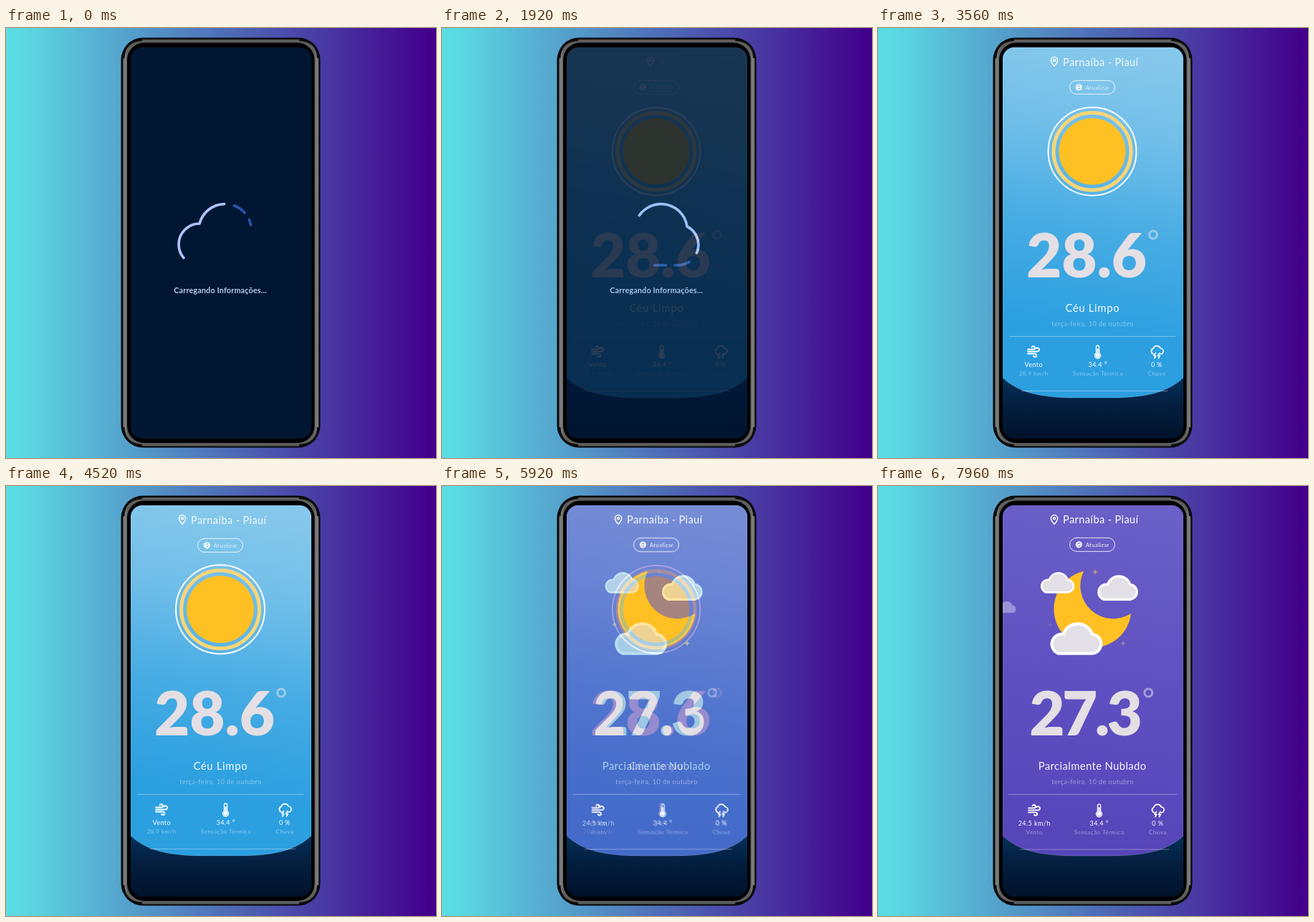
Recreate the animation shown at these times as an HTML page. Size 600 by 600 pixels, loop 8 s.

```html
<!DOCTYPE html>
<html lang="pt-BR">
<head>
<meta charset="utf-8">
<title>Clima</title>
<style>
html, body { margin: 0; width: 100%; height: 100%; overflow: hidden; }
svg { display: block; width: 100vw; height: 100vh; }
text { font-family: Lato, sans-serif; fill: #fff; }
.line { fill: none; stroke: #fff; stroke-linecap: round; stroke-linejoin: round; }
</style>
</head>
<body>
<svg id="stage" viewBox="0 0 600 600"></svg>
<script>
const LOOP = 8000;
const stage = document.getElementById('stage');

const text = (str, x, y, size, gap = 0, alpha = 1, anchor = 'middle', weight = 400) =>
  `<text x="${x + (anchor === 'middle' ? gap / 2 : 0)}" y="${y}" font-size="${size}" letter-spacing="${gap}" ` +
  `opacity="${alpha}" text-anchor="${anchor}" font-weight="${weight}">${str}</text>`;

const gradient = (id, coords, ...stops) =>
  `<linearGradient id="${id}" gradientUnits="userSpaceOnUse" ${coords}>` +
  stops.map(([at, color]) => `<stop offset="${at}" stop-color="${color}"/>`).join('') + '</linearGradient>';

const box = (x, y, w, h, r, fill) =>
  `<rect x="${x}" y="${y}" width="${w}" height="${h}" rx="${r}" fill="${fill}"/>`;

const PUFF = 'M13 44A14 14 0 0 1 20 17A21 21 0 0 1 60 17A13.6 13.6 0 0 1 61 44Z';
const LOADER = 'M270 331A29 29 0 0 1 270 273A36.8 36.8 0 0 1 342 277A28.5 28.5 0 0 1 330 331Z';
const CARD = 'M174 27H426V488C405 508 375 516 325 516H275C225 516 195 508 174 488Z';

const pin = x => `<g class="line" stroke-width="1.5" transform="translate(${x} 47)">
  <path d="M0 6.2C-3 3-4.6 .8-4.6-1.8A4.6 4.6 0 0 1 4.6-1.8C4.6 .8 3 3 0 6.2Z"/><circle cy="-1.8" r="1.4"/></g>`;

const wind = (x, y) => `<path class="line" stroke-width="1.9" transform="translate(${x} ${y})"
  d="M-8-3H-.5A2.2 2.2 0 1 0-2.4-6M-8 0H5.5A2.6 2.6 0 1 0 3.2-4M-8 3H2A2.2 2.2 0 1 1 0 6.2"/>`;

const thermometer = (x, y) => `<g transform="translate(${x} ${y})">
  <path class="line" stroke-width="1.4" d="M-2 2V-6.5A2 2 0 0 1 2-6.5V2A4 4 0 1 1-2 2Z"/>
  <path fill="#fff" d="M-1-4H1V2.5A3 3 0 1 1-1 2.5Z"/></g>`;

const storm = (x, y) => `<g transform="translate(${x} ${y})">
  <path class="line" stroke-width="1.7" d="M-4.5 3A4 4 0 0 1-5-4.6A5.4 5.4 0 0 1 5.2-5A4 4 0 0 1 5 3"/>
  <path class="line" stroke-width="1.6" d="M-1.5 1.5L-4 5.5H-1.2L-3.2 9M4 1.5L1.5 5.5H4.3L2.3 9"/></g>`;

// Parts both weather screens share; dx and dy nudge the lower row.
function card(fill, c) {
  const { dx, dy } = c;
  const cols = [[217 + dx / 2, c.wind], [306.5 + dx, ['34.4 °', 'Sensação Térmica']], [388.7 + dx * .7, ['0 %', 'Chuva']]];
  return `<rect x="174" y="27" width="252" height="546" fill="url(#night)"/>
    <path d="${CARD}" fill="url(#${fill})" stroke="#fff" stroke-opacity=".22" stroke-width=".8"/>
    <path d="M${200 - dx} ${506.5 + dy / 2}H${404 + dx}" stroke="#fff" stroke-opacity=".4" stroke-width=".9"/>
    <g transform="translate(0 ${-dy * .8})">
      <rect class="line" x="267.5" y="73.3" width="63" height="19" rx="9.5" stroke-width="1" opacity=".85"/>
      <circle cx="280.3" cy="82.8" r="4.6" fill="#fff" opacity=".95"/>
      <path d="M278.2 82.4A2.2 2.2 0 0 1 282 81.4M282.4 83.2A2.2 2.2 0 0 1 278.6 84.2" fill="none" stroke="${c.tone}" stroke-width="1"/>
      ${text('Atualizar', 289.7, 85.6, 8, .25, c.label, 'start')}
    </g>
    ${text(c.temp, c.mid, 348, 85, c.tight, 1, 'middle', 900).replace('<text', '<text style="fill:#e4dfe5"')}
    <circle cx="${c.deg}" cy="288.5" r="5.4" fill="none" stroke="#e9e4f0" stroke-opacity=".52" stroke-width="3"/>
    ${text(c.sky, 299, 396, 14.8, c.skyGap, .95)}
    ${text('terça-feira, 10 de outubro', 299.3, 415.6, 9.2, .42, .43)}
    <path d="M${183 - dx / 2} 430.3H${415 + dx}" stroke="#fff" stroke-opacity=".42" stroke-width=".9"/>
    ${wind(217 + dx / 2, 451.5 + dy * .7)}${thermometer(306.5 + dx, 451.5 + dy * .7)}${storm(389 + dx * .5, 452 + dy * .7)}
    ${cols.map(([x, [top, low]]) =>
      text(top, x, 472.7 + dy, 9, .42, 1) + text(low, x, 484.6 + dy * 1.1, 8, .5, .45)).join('')}`;
}

const puff = (id, x, y, s) => `<g id="${id}"><path transform="translate(${x} ${y}) scale(${s})" d="${PUFF}"
  fill="#e2dfe6" stroke="#fff" stroke-width="4"/></g>`;

const star = (x, y) => `<path class="star" fill="#ffd463" transform="translate(${x} ${y})"
  d="M0-4.2Q.5-.5 4.2 0Q.5 .5 0 4.2Q-.5 .5-4.2 0Q-.5-.5 0-4.2Z"/>`;

const seg = (id, stroke) => `<path id="${id}" class="line" d="${LOADER}" stroke-width="3.7" style="stroke:${stroke}"/>`;

const place = (y, alpha) => text('Parnaíba - Piauí', 258, y, 14.5, .4, alpha, 'start');

stage.innerHTML = `<defs>
  ${gradient('wall', 'x1="12" x2="592"', [0, '#5cdde4'], [1, '#42008c'])}
  ${gradient('metal', 'x1="163" x2="437"', [0, '#4a4a4a'], [.01, '#858585'], [.024, '#606060'], [.1, '#5c5c5c'],
    [.9, '#5c5c5c'], [.976, '#606060'], [.99, '#858585'], [1, '#4a4a4a'])}
  ${gradient('night', 'y1="488" y2="572" x1="0" x2="0"', [0, '#053059'], [.5, '#031d3d'], [1, '#01122b'])}
  ${gradient('day', 'x1="325" y1="30" x2="262" y2="425"', [0, '#86c8eb'], [.3, '#70bee9'], [.65, '#45abe3'], [1, '#2b9fe0'])}
  ${gradient('dusk', 'x1="325" y1="30" x2="262" y2="490"', [0, '#6a60c7'], [.5, '#5f51c1'], [1, '#5745ba'])}
  <clipPath id="screen"><rect x="174" y="27" width="252" height="546" rx="16"/></clipPath>
</defs>
${box(0, 0, 600, 600, 0, 'url(#wall)')}
${box(160.5, 13.5, 278, 572, 31, '#050505')}
${box(163, 16, 273.5, 567.5, 29, 'url(#metal)')}
<path d="M164 42Q164.5 18 190 16.5M409 16.5Q435 18 435.5 42M164 557Q164.5 581 190 582.5M409 582.5Q435 581 435.5 557"
  fill="none" stroke="#0c0c0c" stroke-width="3"/>
${box(169, 20.5, 261.5, 558.5, 24, '#000')}
<g clip-path="url(#screen)">
  <g id="loading">
    ${box(174, 27, 252, 546, 0, '#011632')}
    ${seg('main', '#abc5fb')}${seg('dashA', '#2a52a8')}${seg('dashB', '#2555a3')}
    ${text('Carregando Informações...', 299, 370, 10.8, .16, .92, 'middle', 700).replace('<text', '<text style="fill:#c8ddfa"')}
  </g>
  <g id="sunny">
    ${card('day', { dx: 0, dy: 0, tone: '#4fb0e5', label: .75, temp: '28.6', mid: 291, tight: 0, deg: 384,
      sky: 'Céu Limpo', skyGap: .7, wind: ['Vento', '28.9 km/h'] })}
    <g id="empty">${pin(290.5)}${text('-', 309.5, 52.5, 14.5)}</g>
    <g id="found">${pin(246)}${place(52.8, .9)}</g>
    <g id="sun">
      <circle r="61" fill="none" stroke="#fff" stroke-width="1.9"/>
      <circle r="53.6" fill="none" stroke="#fbd576" stroke-width="5"/>
      <circle r="46.2" fill="#ffc023"/>
    </g>
  </g>
  <g id="cloudy">
    ${card('dusk', { dx: 2, dy: 1.2, tone: '#6256c2', label: .95, temp: '27.3', mid: 290, tight: -3.6, deg: 377.3,
      sky: 'Parcialmente Nublado', skyGap: .4, wind: ['24.5 km/h', 'Vento'] })}
    ${pin(246)}${place(51.8, 1)}
    <path id="far" d="${PUFF}" fill="#fff" opacity=".36"/>
    <path d="M287 119A54 54 0 1 0 353 178A46 46 0 0 1 287 119Z" fill="#ffc024"/>
    ${star(303, 120)}${star(240.3, 193.5)}${star(342, 219.5)}
    ${puff('left', 226.7, 119.8, .65)}${puff('right', 305.8, 124, .78)}${puff('front', 239.7, 189.8, 1)}
  </g>
</g>`;

const $ = id => document.getElementById(id);
const fade = (t, from, to) => Math.min(1, Math.max(0, (t - from) / (to - from)));
const wave = (t, peak, period) => Math.cos((t - peak) / period * Math.PI * 2);
const length = $('main').getTotalLength();
const stars = [...document.querySelectorAll('.star')];
const peaks = [7400, 6480, 5700];

function arc(id, start, len) {
  $(id).style.strokeDasharray = `${len} ${length - len}`;
  $(id).style.strokeDashoffset = -(start % length);
}

function draw(t) {
  const stretch = 1.17 - .17 * wave(t, 0, 1550);
  const tail = 25 + t * .2115;
  arc('main', tail, 113 * stretch);
  arc('dashA', tail + 127 * stretch, 18 * stretch);
  arc('dashB', tail + 156 * stretch, 8 + 48 * (stretch - 1));

  $('sunny').style.opacity = fade(t, 1840, 2300);
  $('cloudy').style.opacity = fade(t, 5600, 6160);
  $('empty').style.display = t < 3000 ? '' : 'none';
  $('found').style.display = t < 3000 ? 'none' : '';

  const pulse = 1.008 - .008 * wave(t, 2600, 3840);
  $('sun').setAttribute('transform', `translate(299 172.2) scale(${pulse})`);

  const sway = .5 * wave(t, 6480, 2960) - .4;
  for (const id of ['left', 'right', 'front']) $(id).setAttribute('transform', `translate(${sway} 0)`);
  $('far').setAttribute('transform', `translate(${151.5 + (t - 6480) * .0088} 160) scale(.385)`);
  stars.forEach((s, i) => s.style.opacity = .1 + .9 * ((1 + wave(t, peaks[i], 3000)) / 2) ** 2);
}

const begin = performance.now();
function tick() {
  draw((performance.now() - begin) % LOOP);
  requestAnimationFrame(tick);
}
tick();
</script>
</body>
</html>
```
